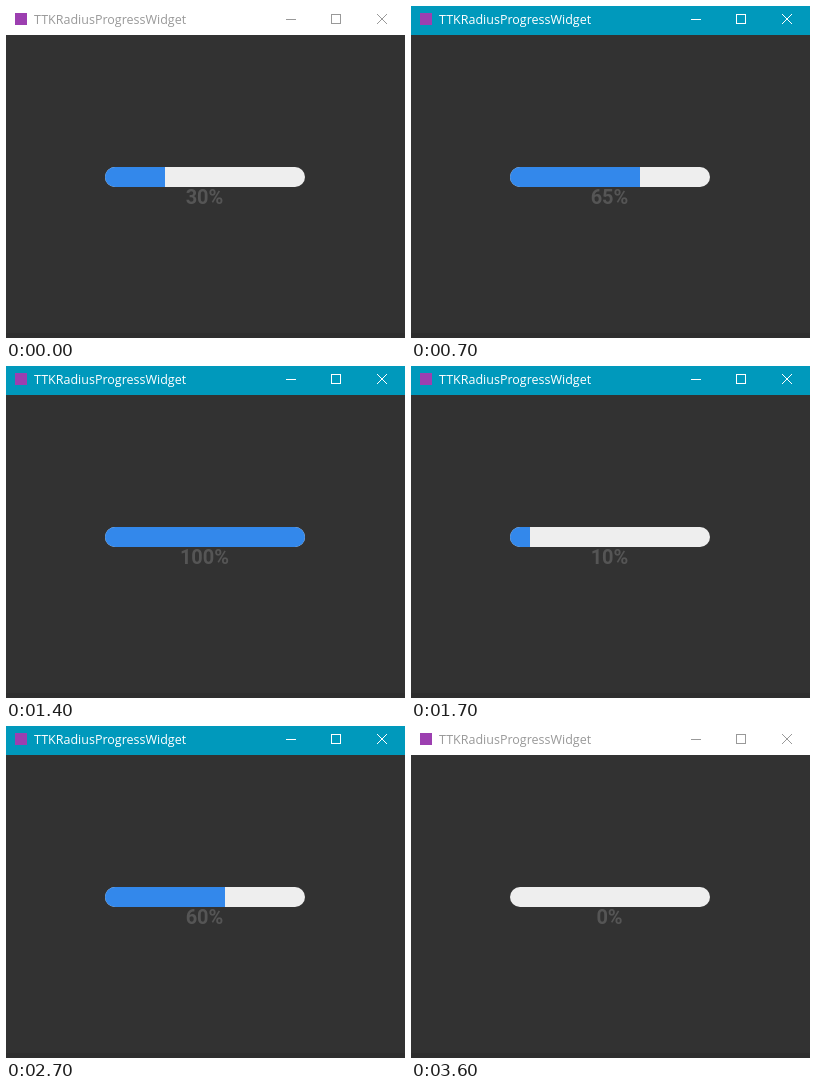
An HTML page that plays this animation: 399 by 332 pixels, repeating every 3.7 s.

```html
<!DOCTYPE html>
<html lang="en">
<head>
<meta charset="utf-8">
<style>
  html, body { margin: 0; width: 399px; height: 332px; overflow: hidden; background: #323232; }
  svg { display: block; }
  #title { font: 12.5px "Open Sans", "Noto Sans", sans-serif; }
  #label { font: bold 20px Roboto, sans-serif; text-anchor: middle; fill: #555; }
  #bar { fill: #fff; --ink: #999; }
  #bar.active { fill: #0099bc; --ink: #fff; }
  #title { fill: var(--ink); }
  #buttons { fill: none; stroke: var(--ink); }
</style>
</head>
<body>
<svg width="399" height="332">
  <clipPath id="pill"><rect x="99" y="161" width="200" height="20" rx="10"/></clipPath>
  <rect y="327" width="399" height="5" fill="#2e2e2e"/>
  <g id="bar">
    <rect width="399" height="29"/>
    <rect x="9" y="7" width="12" height="12" fill="#9c3fb0"/>
    <text id="title" x="28" y="18">TTKRadiusProgressWidget</text>
    <g id="buttons">
      <path d="M280 13.5h10M325.5 8.5h9v9h-9z" shape-rendering="crispEdges"/>
      <path d="M371 8l10 10M381 8l-10 10"/>
    </g>
  </g>
  <rect x="99" y="161" width="200" height="20" rx="10" fill="#eee"/>
  <g clip-path="url(#pill)">
    <rect id="fill" x="99" y="161" height="20" fill="#3388eb"/>
  </g>
  <text id="label" x="198.5" y="198"></text>
</svg>
<script>
  const LOOP = 3700, TICK = 100, START = 6, STEPS = 21;
  const el = id => document.getElementById(id);

  function draw(now) {
    const time = now % LOOP;
    // 0 to 100 percent in steps of five, then back to zero
    const percent = (START + Math.floor(time / TICK)) % STEPS * 5;
    el("fill").setAttribute("width", percent * 2);
    el("label").textContent = percent + "%";
    el("bar").classList.toggle("active", time >= 300 && time < 3500);
    requestAnimationFrame(draw);
  }
  draw(performance.now());
</script>
</body>
</html>
```
